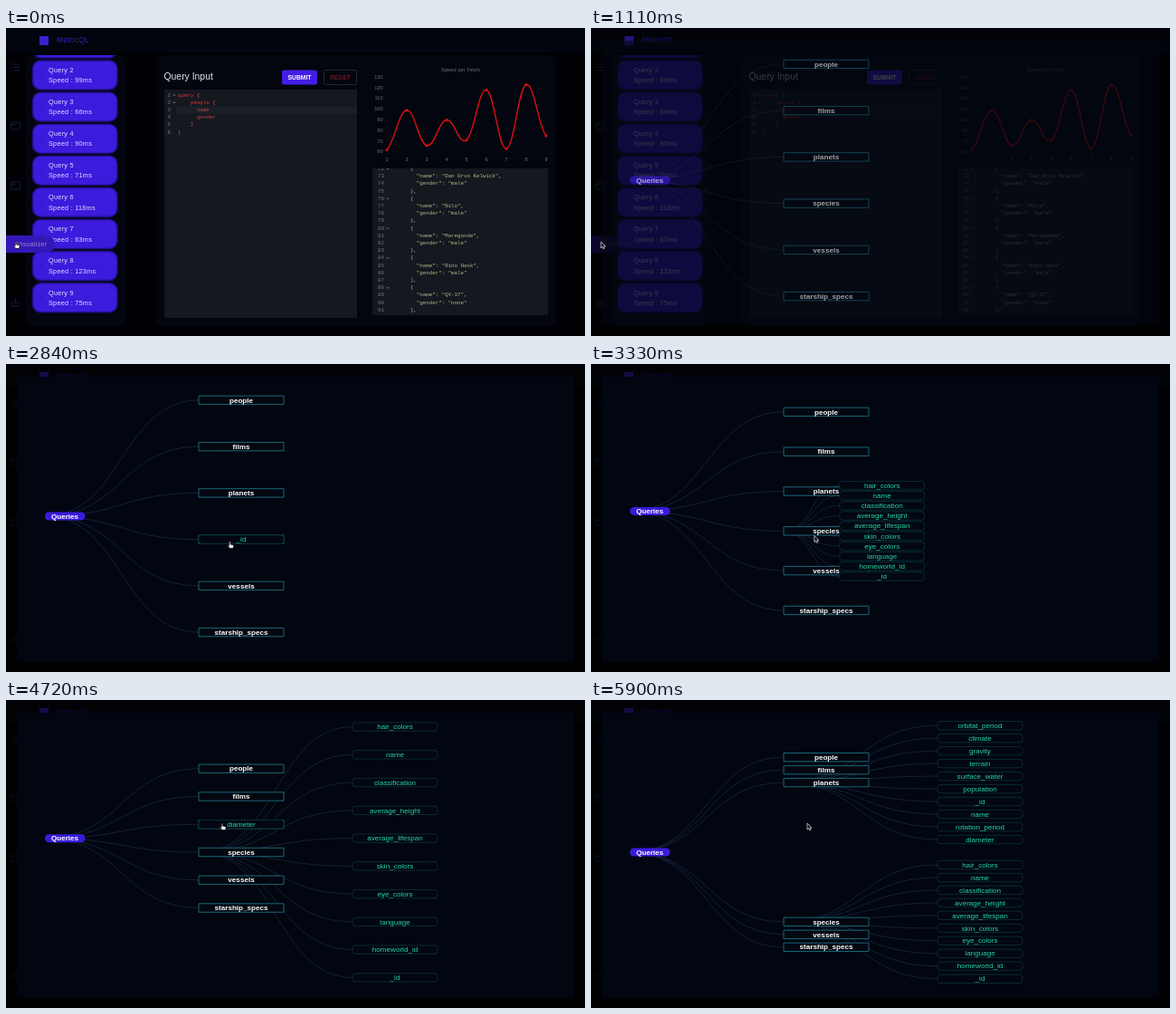
These frames come from a looping animation (640x340 px, 5970 ms). An HTML page with a canvas:

```html
<!DOCTYPE html>
<html lang="en">
<head>
<meta charset="utf-8">
<style>
html, body { margin: 0; width: 100%; height: 100%; overflow: hidden; background: #010105; }
canvas { display: block; }
</style>
</head>
<body>
<canvas id="stage" width="640" height="340"></canvas>
<script>
const ctx = document.getElementById('stage').getContext('2d');
const LOOP = 5970;
const SANS = '"Liberation Sans", Arial, sans-serif';
const MONO = '"Liberation Mono", monospace';
const NODE_W = 94, NODE_H = 9.4;
const DEPTH_X = [43, 213, 383];
const MID_Y = 168;

const speeds = [62, 99, 66, 90, 71, 118, 63, 123, 75];
const people = [
  ['Dan Orvo Kelwick', 'male'], ['Nilo', 'male'], ['Maregonde', 'male'],
  ['Rino Hask', 'male'], ['QV-37', 'none']
];
const queryNames = ['people', 'films', 'planets', 'species', 'vessels', 'starship_specs'];
const speciesFields = ['hair_colors', 'name', 'classification', 'average_height', 'average_lifespan',
  'skin_colors', 'eye_colors', 'language', 'homeworld_id', '_id'];
const planetFields = ['orbital_period', 'climate', 'gravity', 'terrain', 'surface_water',
  'population', '_id', 'name', 'rotation_period', 'diameter'];
const PLANETS = 2, SPECIES = 3;

const clamp = v => Math.max(0, Math.min(1, v));
const lerp = (a, b, p) => a + (b - a) * p;
const cubicInOut = p => p < .5 ? 4 * p ** 3 : 1 - 4 * (1 - p) ** 3;
const progress = (t, start, length) => clamp((t - start) / length);

function box(x, y, w, h, r, fill, stroke, line = 1) {
  ctx.beginPath();
  ctx.roundRect(x, y, w, h, r);
  if (fill) { ctx.fillStyle = fill; ctx.fill(); }
  if (stroke) { ctx.strokeStyle = stroke; ctx.lineWidth = line; ctx.stroke(); }
}

function text(str, x, y, font, color, align = 'left', spacing = 0) {
  ctx.font = font;
  ctx.fillStyle = color;
  ctx.textAlign = align;
  ctx.textBaseline = 'middle';
  ctx.letterSpacing = spacing + 'px';
  ctx.fillText(str, x, y);
}

function polyline(points, color, width) {
  ctx.beginPath();
  points.forEach(([x, y]) => ctx.lineTo(x, y));
  ctx.strokeStyle = color;
  ctx.lineWidth = width;
  ctx.stroke();
}

function clipped(x, y, w, h, paint) {
  ctx.save();
  ctx.beginPath();
  ctx.rect(x, y, w, h);
  ctx.clip();
  paint();
  ctx.restore();
}

function drawSideIcons() {
  const color = '#151a3a';
  for (const y of [40, 43.5, 47]) {
    polyline([[8, y], [15, y]], color, 1);
    polyline([[5, y], [6.5, y]], color, 1);
  }
  for (const y of [104, 170]) {
    box(5.5, y, 10, 8, 1, null, color);
    polyline([[5.5, y + 2.5], [10, y + 2.5]], color, 1);
  }
  box(6, 303, 9, 4, 1, null, color);
  polyline([[10.5, 299], [10.5, 303]], color, 1);
}

function drawQueryList() {
  const font = '7.3px ' + SANS, color = '#e2dcff';
  box(22, 30, 110, 299, 8, '#03060f');
  clipped(22, 30, 110, 299, () => speeds.forEach((speed, i) => {
    const y = 16.9 + i * 35.1;
    box(29.5, y - 16, 93.5, 32, 9, '#3d1bdc', '#20108a', 1.6);
    polyline([[38.5, y - 2], [40.5, y], [38.5, y + 2]], '#2a1499', 1);
    text('Query ' + (i + 1), 47, y - 5.2, font, color, 'left', .25);
    text(`Speed : ${speed}ms`, 47, y + 6.1, font, color, 'left', .25);
  }));
}

function codeLine(number, indent, parts, x, y, foldable) {
  const font = '5.8px ' + MONO;
  text(number, x - 8, y, font, '#747983', 'right');
  if (foldable) polyline([[x - 5.6, y - .6], [x - 4.2, y + .8], [x - 2.8, y - .6]], '#8a8f99', .8);
  let column = indent;
  for (const [str, color] of parts) {
    text(str, x + column * 3.48, y, font, color);
    column += str.length;
  }
}

function drawEditor() {
  text('Query Input', 174.5, 54.5, '10.4px ' + SANS, '#e4e5ea');
  box(305, 46.5, 39, 16, 2, '#431de6');
  text('SUBMIT', 324.5, 55, 'bold 6.8px ' + SANS, '#ffffff', 'center');
  box(351.5, 46.5, 36, 16, 2, null, '#24262e');
  text('RESET', 369.5, 55, '6.8px ' + SANS, '#a51922', 'center');

  box(175, 68, 213, 252, 0, '#15181f');
  box(188, 86.5, 200, 8.2, 0, '#1b1f26');
  const lines = [[0, 'query', ' {'], [4, 'people', ' {'], [6, 'name', ''], [6, 'gender', ''], [4, '', '}'], [0, '', '}']];
  lines.forEach(([indent, word, brace], i) =>
    codeLine(i + 1, indent, [[word, '#d0413e'], [brace, '#c0605c']], 190, 74 + i * 8.2, i < 2));
}

function drawResults() {
  const plain = '#a9b0ae', str = '#a3c386';
  box(405, 155, 194, 162, 0, '#15181f');
  clipped(405, 155, 194, 162, () => people.forEach(([name, gender], i) => {
    const rows = [
      [6, [['{', plain]]],
      [8, [['"name"', str], [': ', plain], [`"${name}"`, str], [',', plain]]],
      [8, [['"gender"', str], [': ', plain], [`"${gender}"`, str]]],
      [6, [['},', plain]]]
    ];
    rows.forEach(([indent, parts], j) => {
      const n = i * 4 + j;
      codeLine(72 + n, indent, parts, 426, 155.4 + n * 8.2, j === 0);
    });
  }));
}

function drawChart() {
  const font = '5.6px ' + SANS, gray = '#6d7078', red = '#d8100f';
  text('Speed per Fetch', 502.5, 46.8, font, gray, 'center', .1);
  const py = v => 54.3 + (130 - v) * 1.178;
  for (let v = 60; v <= 130; v += 10) text(v, 416.5, py(v), font, gray, 'right');
  const pts = speeds.map((v, i) => [421 + i * 22, py(v)]);
  pts.forEach(([x], i) => text(i + 1, x, 145, font, gray, 'center'));

  const slope = i => (pts[Math.min(8, i + 1)][1] - pts[Math.max(0, i - 1)][1]) / 2;
  ctx.beginPath();
  ctx.moveTo(...pts[0]);
  for (let i = 0; i < 8; i++) {
    const [x0, y0] = pts[i], [x1, y1] = pts[i + 1];
    ctx.bezierCurveTo(x0 + 8.8, y0 + slope(i) * .4, x1 - 8.8, y1 - slope(i + 1) * .4, x1, y1);
  }
  ctx.strokeStyle = red;
  ctx.lineWidth = 1.4;
  ctx.stroke();
  ctx.fillStyle = red;
  for (const [x, y] of pts) {
    ctx.beginPath();
    ctx.arc(x, y, 1.5, 0, 7);
    ctx.fill();
  }
}

function drawDashboard() {
  box(0, 0, 640, 340, 0, '#010105');
  box(0, 0, 640, 27, 0, '#02050d');
  box(37, 9, 10, 10, 0, '#3c20cf');
  text('MetricQL', 56, 14, '8.2px ' + SANS, '#3620c4', 'left', .35);
  drawSideIcons();
  drawQueryList();
  box(166, 30, 442, 299, 8, '#03060f');
  drawEditor();
  drawChart();
  drawResults();
}

function drawTooltip() {
  box(-10, 229, 64, 19, 9.5, '#3417b8');
  text('Visualizer', 12, 239, '7.3px ' + SANS, '#9486c4', 'left', .2);
}

// Node positions for the tree with zero, one and two branches open.
function treeAt(t) {
  const first = cubicInOut(progress(t, 2949, 850));
  const second = cubicInOut(progress(t, 4701, 850));
  const blend = (a, b, c) => lerp(lerp(a, b, first), c, second);
  const [wide, medium, tight] = [51.25, 30.75, 13.98];
  const queries = queryNames.map((label, i) => ({
    label, x: DEPTH_X[1],
    y: blend(MID_Y + (i - 2.5) * wide, MID_Y + (i - 3) * medium, MID_Y + (i + (i < 3 ? -7.5 : 2.5)) * tight)
  }));
  const leaves = (labels, p, y) => labels.map((label, i) => ({
    label, x: lerp(DEPTH_X[1], DEPTH_X[2], p), y: y(i)
  }));
  return {
    root: { x: DEPTH_X[0], y: (queries[0].y + queries[5].y) / 2 },
    queries,
    species: t < 2790 ? [] : leaves(speciesFields, first,
      i => blend(MID_Y + wide / 2, MID_Y + (i - 4.5) * medium, MID_Y + (i + 1) * tight)),
    planets: t < 4560 ? [] : leaves(planetFields, second,
      i => lerp(MID_Y - medium, MID_Y + (i - 10) * tight, second))
  };
}

function drawLinks(from, targets) {
  ctx.strokeStyle = '#1a283c';
  ctx.lineWidth = .8;
  for (const to of targets) {
    const mid = (from.x + to.x) / 2;
    ctx.beginPath();
    ctx.moveTo(from.x, from.y);
    ctx.bezierCurveTo(mid, from.y, mid, to.y, to.x, to.y);
    ctx.stroke();
  }
}

function drawNode({ label, x, y }, leaf) {
  box(x, y - NODE_H / 2, NODE_W, NODE_H, leaf ? 3 : 0, '#020711', leaf ? '#0b343c' : '#1a6676', leaf ? .8 : 1);
  text(label, x + NODE_W / 2, y + .4, (leaf ? '' : 'bold ') + '8.1px ' + SANS, leaf ? '#24d8a4' : '#ffffff', 'center');
}

function drawTree({ root, queries, species, planets }) {
  drawLinks(root, queries);
  drawLinks(queries[SPECIES], species);
  drawLinks(queries[PLANETS], planets);
  box(root.x, root.y - 4.5, 44.5, 9, 4.5, '#3a1bdc');
  text('Queries', root.x + 22, root.y + .4, 'bold 8.1px ' + SANS, '#ffffff', 'center');
  queries.forEach(n => drawNode(n, false));
  [...species, ...planets].forEach(n => drawNode(n, true));
}

const cursorPath = [[0, 11, 236], [1420, 11, 236], [1670, 45.5, 226.5], [2080, 112, 213], [2640, 247.5, 196],
  [3260, 247.5, 196], [3680, 244, 158], [4050, 239, 136], [LOOP, 239, 136]];

function cursorAt(t) {
  const i = cursorPath.findIndex(k => k[0] > t);
  const [t0, x0, y0] = cursorPath[i - 1], [t1, x1, y1] = cursorPath[i];
  const p = (t - t0) / (t1 - t0);
  return [lerp(x0, x1, p), lerp(y0, y1, p)];
}

const arrow = new Path2D('M0 0V7L1.6 5.5L2.7 7.8L3.8 7.3L2.8 5.1H5Z');
const hand = new Path2D('M-.8 .6Q0 -.4 .7 .6V3L3.6 3.7Q4.4 4 4.2 5L3.5 7.5H-.3L-2.4 4.6Q-2 3.6 -.8 4.5Z');

function drawCursor(t, queries) {
  const [x, y] = cursorAt(t);
  const overNode = x > DEPTH_X[1] && queries.some(n => Math.abs(n.y - y) < NODE_H / 2);
  const pointing = t < 690 || overNode;
  const shape = pointing ? hand : arrow;
  ctx.save();
  ctx.translate(x, y);
  ctx.lineWidth = .8;
  ctx.fillStyle = pointing ? '#f2f2f2' : '#05070c';
  ctx.strokeStyle = pointing ? '#111111' : '#d5d9df';
  ctx.fill(shape);
  ctx.stroke(shape);
  ctx.restore();
}

function draw(t) {
  const tree = treeAt(t);
  const shown = progress(t, 950, 260);
  ctx.globalAlpha = 1;
  drawDashboard();
  ctx.globalAlpha = 1 - shown;
  drawTooltip();
  ctx.globalAlpha = shown * .65;
  box(0, 0, 640, 340, 0, '#000002');
  ctx.globalAlpha = shown * .97;
  box(12, 14, 616, 314, 1, '#020711');
  ctx.globalAlpha = shown;
  drawTree(tree);
  ctx.globalAlpha = 1;
  drawCursor(t, tree.queries);
}

const begin = performance.now();
function tick() {
  draw((performance.now() - begin) % LOOP);
  requestAnimationFrame(tick);
}
tick();
</script>
</body>
</html>
```
